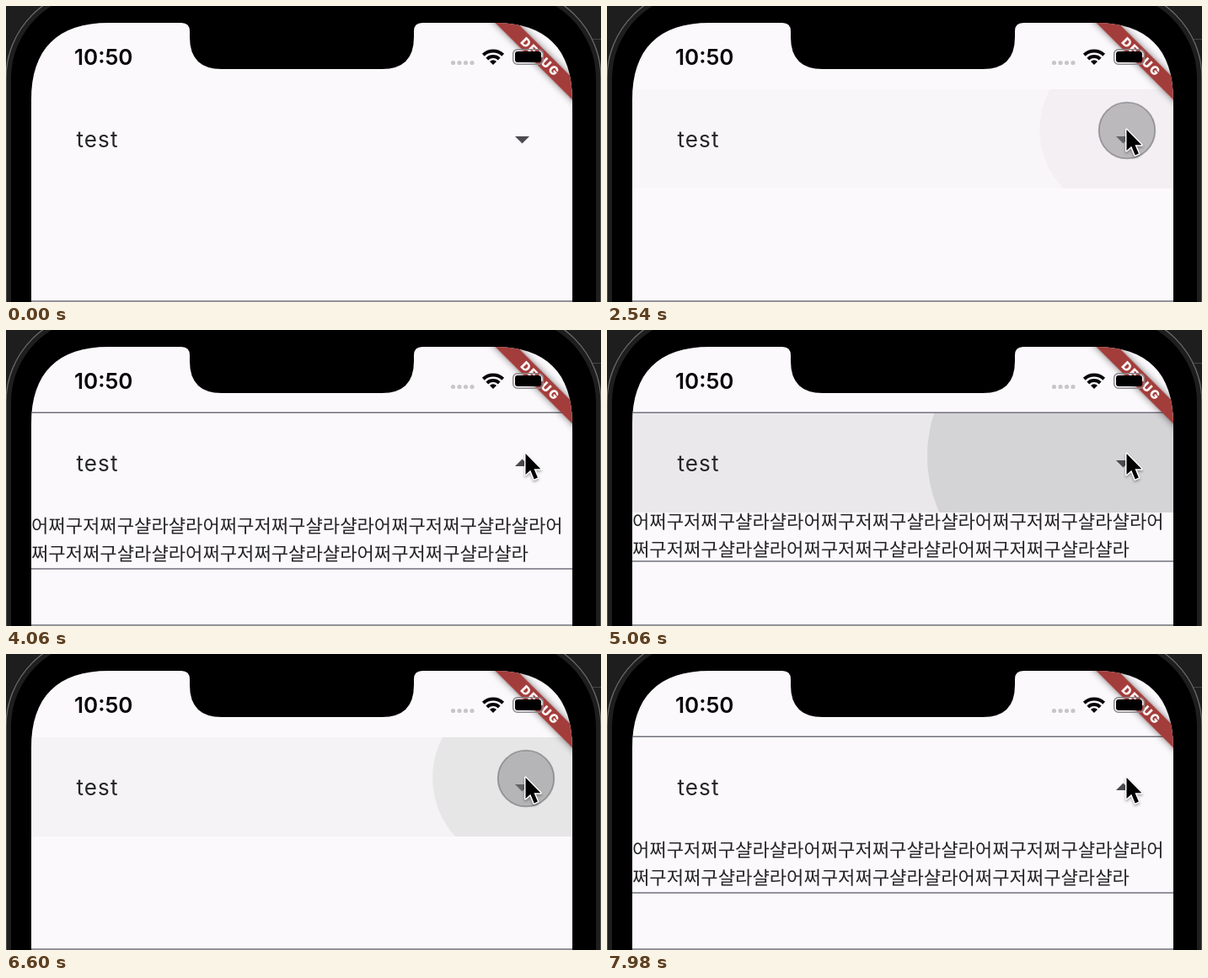
Write an HTML page that moves like this. It is 706 px wide and 352 px high and loops after 8 s.

```html
<!DOCTYPE html>
<html lang="ko">
<head>
<meta charset="utf-8">
<style>
  html, body { margin: 0; width: 100%; height: 100%; overflow: hidden; background: #1e1e1e; }
  svg { display: block; width: 706px; height: 352px; }
  text { font-family: Inter, Roboto, sans-serif; }
  .body { font: 22.12px "Noto Sans CJK KR", "Noto Sans CJK", "Noto Sans CJK JP", sans-serif; fill: #242426; }
  .banner { filter: drop-shadow(0 0 4px rgba(0, 0, 0, .5)); }
  #cursor { filter: drop-shadow(0 2px 1.5px rgba(0, 0, 0, .3)); }
</style>
</head>
<body>
<svg viewBox="0 0 706 352">
  <defs>
    <path id="screen" d="M30 360V112C30 51 61 20 122 20H208Q218 20 218 30V37Q218 75 256 75H446Q484 75 484 37V30Q484 20 494 20H580C641 20 672 51 672 112V360Z"/>
    <clipPath id="screenClip"><use href="#screen"/></clipPath>
    <clipPath id="rowClip"><rect x="30" y="99" width="642" height="118"/></clipPath>
    <clipPath id="bodyClip"><rect id="bodyArea" x="30" y="217" width="642" height="0"/></clipPath>
  </defs>

  <!-- phone -->
  <path d="M690 39.5H706" stroke="#444"/>
  <rect x="0" y="-21" width="706" height="500" rx="107" fill="#1e1e1e" stroke="#6b6b6b" stroke-width="1.3"/>
  <rect x="6" y="-15" width="694" height="500" rx="101"/>
  <use href="#screen" fill="#fcf9fc"/>

  <!-- expansion tile -->
  <g clip-path="url(#rowClip)">
    <rect id="highlight" x="30" y="98" width="642" height="119" fill="#a8a7aa"/>
    <circle id="ripple" fill="#b2b1b4"/>
  </g>
  <text x="83.5" y="168" font-size="26" letter-spacing="1.1" fill="#252527">test</text>
  <path id="arrow" fill="#4a4a50"/>
  <g clip-path="url(#bodyClip)">
    <g id="body" class="body"><text id="line1" x="30" y="241"/><text id="line2" x="30" y="274"/></g>
  </g>
  <g id="borders" stroke="#70707e" stroke-width="1.6">
    <path d="M30 98.3H672"/>
    <path id="bottomBorder" d="M30 217H672"/>
  </g>
  <path d="M30 351H672" stroke="#70707a" stroke-width="1.5"/>

  <!-- debug banner -->
  <g clip-path="url(#screenClip)">
    <g transform="translate(633.5 60) rotate(45)">
      <rect class="banner" x="-110" y="-9.2" width="220" height="18.4" fill="#a33d3b"/>
      <text x=".8" y="5.3" text-anchor="middle" font-size="14.5" font-weight="900" letter-spacing="1.7" fill="#fbf3f3">DEBUG</text>
    </g>
  </g>

  <!-- status bar -->
  <text x="81" y="70" font-size="26" font-weight="600" fill="#060608">10:50</text>
  <g fill="#c9c6ca">
    <circle cx="530.5" cy="67.5" r="2.6"/><circle cx="538" cy="67.5" r="2.6"/>
    <circle cx="545.5" cy="67.5" r="2.6"/><circle cx="553" cy="67.5" r="2.6"/>
  </g>
  <g fill="none" stroke="#060608" stroke-width="4">
    <path d="M566.3 58.2A16.8 16.8 0 0 1 589.7 58.2"/>
    <path d="M570.8 63A10.4 10.4 0 0 1 585.2 63"/>
    <path d="M578 70L574 66A5.7 5.7 0 0 1 582 66Z" fill="#060608" stroke="none"/>
  </g>
  <rect x="601.7" y="51.7" width="35.6" height="17.6" rx="5" fill="none" stroke="#8d878c" stroke-width="1.5"/>
  <rect x="604" y="54" width="31" height="13" rx="3"/>

  <!-- pointer -->
  <circle id="touch" cx="617" cy="148" r="33.3" fill="rgba(125,125,128,.48)" stroke="rgba(100,100,104,.55)" stroke-width="1.8"/>
  <path id="cursor" d="M0 0V25L5.8 19.8L10.2 30.4L14.4 28.5L10 18.2H17.8Z" stroke="#fff" stroke-width="3" paint-order="stroke" stroke-linejoin="round"/>
</svg>
<script>
const $ = id => document.getElementById(id);
const set = (id, attrs) => { for (const k in attrs) $(id).setAttribute(k, attrs[k]); };
const clamp = v => Math.min(1, Math.max(0, v));
const mix = (a, b, t) => a + (b - a) * t;

const phrase = '어쩌구저쩌구샬라샬라'.repeat(6);
$('line1').textContent = phrase.slice(0, 31);
$('line2').textContent = phrase.slice(31);

function bezier(x1, y1, x2, y2) {
  const at = (a, b, s) => 3 * a * s * (1 - s) ** 2 + 3 * b * s * s * (1 - s) + s ** 3;
  return x => {
    if (x <= 0 || x >= 1) return clamp(x);
    let lo = 0, hi = 1;
    for (let i = 0; i < 24; i++) {
      const mid = (lo + hi) / 2;
      if (at(x1, x2, mid) < x) lo = mid; else hi = mid;
    }
    return at(y1, y2, lo);
  };
}
const ease = bezier(.25, .1, .25, 1);
const easeIn = bezier(.42, 0, 1, 1);
const easeOut = bezier(0, 0, .58, 1);

const LOOP = 8000, BODY = 67, HOLD = 118, PRESS_DELAY = 100;
const taps = [1016, 1800, 2445];   // release times on the app clock

// Playback repeats holds of 100, 20 and 20 ms; each hold is one 60 Hz step of the app.
function appTime(ms) {
  const u = ms - 20, cycle = Math.floor(u / 140), rest = u - cycle * 140;
  const step = rest < 100 ? 0 : rest < 120 ? 1 : 2;
  return (cycle * 3 + step + 1) * 1000 / 60;
}

function drawInk(t) {
  const release = taps.find(r => t >= r - HOLD && t < r + 375);
  if (!release) {
    set('highlight', { opacity: 0 });
    set('ripple', { opacity: 0 });
    return;
  }
  const held = Math.min(t - release + HOLD, HOLD), since = Math.max(0, t - release);
  const grow = ease(clamp(held / 1000 + since / 225));
  const fade = clamp((held + since) / 75) * (1 - clamp((since - 225) / 150));
  set('highlight', { opacity: .4 * clamp((held - since) / 200) });
  set('ripple', {
    cx: mix(616, 351, grow), cy: mix(147, 158, grow), r: mix(98, 331, grow), opacity: .4 * fade
  });
}

function drawTile(t) {
  const count = taps.filter(r => t >= r).length, open = count % 2 === 1;
  const progress = count ? clamp((t - taps[count - 1]) / 200) : 0;
  const value = count === 0 ? 0 : open ? progress : 1 - progress;
  const height = BODY * easeIn(value);
  set('bodyArea', { height });
  set('body', { transform: `translate(0 ${(height - BODY) / 2})` });
  set('bottomBorder', { transform: `translate(0 ${height})` });
  set('borders', { opacity: easeOut(value) });
  set('arrow', { d: open ? 'M604 162H621L612.5 153.5Z' : 'M604 155H621L612.5 163.5Z' });
}

function drawPointer(t) {
  const arrive = 1 - (1 - clamp((t - 80) / 400)) ** 3;
  set('cursor', { transform: `translate(${mix(650, 616.5, arrive)} ${mix(358, 147, arrive)})` });
  const pressed = taps.some(r => t >= r - HOLD - PRESS_DELAY && t < r);
  set('touch', { opacity: pressed ? 1 : 0 });
}

function draw() {
  const t = appTime(performance.now() % LOOP);
  drawInk(t);
  drawTile(t);
  drawPointer(t);
  requestAnimationFrame(draw);
}
draw();
</script>
</body>
</html>
```
